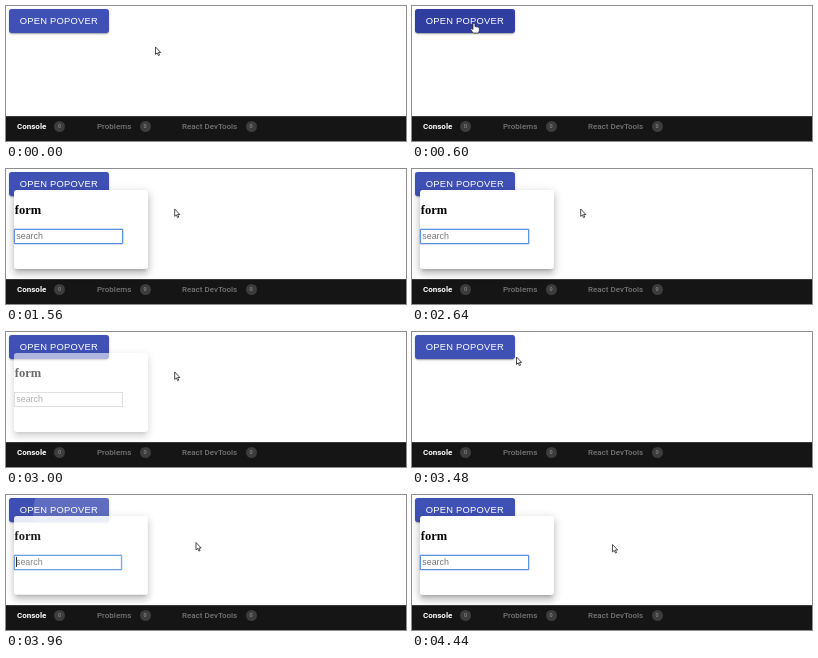
Write an HTML page that moves like this. It is 400 px wide and 135 px high and loops after 5040 ms.

```html
<!DOCTYPE html>
<html lang="en">
<head>
<meta charset="utf-8">
<title>Popover form</title>
<style>
html, body { margin: 0; width: 100%; height: 100%; overflow: hidden; background: #fff; }
#stage { position: relative; width: 400px; height: 135px; overflow: hidden; background: #fff; }
#stage div, #stage span, #stage svg { position: absolute; white-space: pre; }
#button {
  left: 3px; top: 3px; width: 100px; height: 24px; border-radius: 2.7px;
  box-shadow: 0 2px .7px -1.3px rgba(0,0,0,.2), 0 1.3px 1.3px rgba(0,0,0,.14), 0 .7px 3.3px rgba(0,0,0,.12);
  overflow: hidden;
}
#label { left: 10.7px; color: #fff; font: 9.33px/24px "Liberation Sans", Arial, sans-serif; letter-spacing: .27px; }
#ripple { border-radius: 50%; background: #fff; }
#bar { left: 0; top: 110px; width: 400px; height: 25px; background: #151515; box-shadow: inset 0 1px #3a3a3a; }
#bar .tab { top: 5.6px; color: #757575; font: 500 8px/10px Roboto, sans-serif; }
#bar .on { color: #fff; font-weight: 700; }
#bar .badge {
  top: 5px; width: 11px; height: 11px; border-radius: 50%; background: #3c3c3c;
  color: #858585; font: 500 5.5px/11px Roboto, sans-serif; text-align: center;
}
#popover {
  left: 8.3px; top: 21px; width: 134px; height: 79px; border-radius: 2.7px; background: #fff;
  transform-origin: 0 0;
  box-shadow: 0 3.3px 3.3px -2px rgba(0,0,0,.2), 0 5.3px 6.7px .7px rgba(0,0,0,.14), 0 2px 9.3px 1.3px rgba(0,0,0,.12);
}
#title { left: .5px; top: 12.8px; color: #000; font: bold 12.5px/14px "Liberation Serif", Times, serif; }
#field { left: 0; top: 38.6px; width: 106.4px; height: 13px; border: 1px solid #c8c8c8; }
#field.focus { border-color: #5a93e2; box-shadow: 0 0 0 .5px rgba(90,147,226,.6); border-radius: .7px; }
#hint { left: 1px; top: 1.5px; color: #757575; font: 8.9px/10px "Liberation Sans", Arial, sans-serif; }
#caret { left: .6px; top: 1.5px; width: .8px; height: 10px; background: #111; }
#stage svg { left: 0; top: 0; width: 400px; height: 135px; }
</style>
</head>
<body>
<div id="stage">
  <div id="button"><span id="label">OPEN POPOVER</span><div id="ripple"></div></div>
  <div id="bar">
    <span class="tab on" style="left:11px">Console</span><span class="badge" style="left:48px">0</span>
    <span class="tab" style="left:91px">Problems</span><span class="badge" style="left:133.5px">0</span>
    <span class="tab" style="left:176px">React DevTools</span><span class="badge" style="left:239.5px">0</span>
  </div>
  <div id="popover">
    <span id="title">form</span>
    <div id="field"><span id="hint">search</span><div id="caret"></div></div>
  </div>
  <svg viewBox="0 0 400 135">
    <path id="arrow" d="M0 0V7.4L1.7 5.9L2.9 8.6L4.1 8.1L2.9 5.5H5.2Z" fill="#fff" stroke="#222" stroke-width=".8" stroke-linejoin="round"/>
    <path id="hand" d="M-1 .8Q0 -.6 1 .8V3.7Q2 3 2.7 4Q3.7 3.4 4.2 4.4Q5.2 4 5.3 5.4V7.4L4.4 10H-.9L-3.2 6.6Q-3.3 5.2 -2 5.6L-1 6.5Z" fill="#fff" stroke="#222" stroke-width=".7" stroke-linejoin="round"/>
  </svg>
</div>
<script>
const LOOP = 5040, STEP = 120, GROW = 249, HOVER = 250, RIPPLE = 550;
const $ = id => document.getElementById(id);
const clamp = v => Math.min(1, Math.max(0, v));
const mix = (a, b, k) => a + (b - a) * k;

// cubic-bezier(.4, 0, .2, 1), solved by bisection
function ease(x) {
  x = clamp(x);
  let lo = 0, hi = 1;
  for (let i = 0; i < 20; i++) {
    const u = (lo + hi) / 2, v = 1 - u;
    if (1.2 * v * v * u + .6 * v * u * u + u * u * u < x) lo = u; else hi = u;
  }
  return lo * lo * (3 - 2 * lo);
}
const ramp = (t, start, length) => ease((t - start) / length);

// time, x, y of the pointer tip
const path = [
  [0, 149.5, 41], [120, 145, 39.5], [240, 125, 34], [360, 96, 25], [480, 72, 19.5], [600, 62, 17],
  [960, 62, 17], [1080, 100, 28], [1200, 150, 39], [1320, 168.7, 40],
  [3120, 168.7, 40], [3240, 157, 38], [3360, 128, 31], [3480, 104.5, 25], [3600, 84, 19],
  [3720, 79, 17], [3840, 84, 18], [3960, 190, 47.5], [4080, 198, 49], [4200, 200.5, 49.5], [LOOP, 200.5, 49.5]
];
const visits = [
  { hover: 350, press: 840, open: 930, close: 2920, x: 62, y: 18 },
  { hover: 3540, press: 3720, open: 3810, close: Infinity, x: 80, y: 18 }
];

function pointerAt(t) {
  const i = path.findIndex(p => p[0] > t), a = path[i - 1], b = path[i];
  const k = (t - a[0]) / (b[0] - a[0]);
  return [mix(a[1], b[1], k), mix(a[2], b[2], k)];
}

function drawButton(t, v) {
  const h = ramp(t, v.hover, HOVER) * (1 - ramp(t, v.open, HOVER));
  const rgb = [[63, 48], [81, 63], [181, 159]].map(([a, b]) => Math.round(mix(a, b, h)));
  $('button').style.background = `rgb(${rgb})`;

  const x = v.x - 3, y = v.y - 3;
  const full = Math.hypot(Math.max(x, 100 - x), Math.max(y, 24 - y));
  const grow = ramp(t, v.press, RIPPLE), r = full * grow, s = $('ripple').style;
  s.left = x - r + 'px';
  s.top = y - r + 'px';
  s.width = s.height = 2 * r + 'px';
  s.opacity = mix(.1, .3, grow) * (1 - ramp(t, v.open, RIPPLE));
}

function drawPopover(t, v) {
  const closing = t >= v.close;
  const shown = closing ? 1 - ramp(t, v.close, GROW) : ramp(t, v.open, GROW);
  const size = closing ? 1 - ramp(t, v.close + GROW / 3, GROW * 2 / 3) : ramp(t, v.open, GROW * 2 / 3);
  const s = $('popover').style;
  s.opacity = shown;
  s.visibility = shown > 0 ? 'visible' : 'hidden';
  s.transform = size === 1 ? 'none' : `scale(${mix(.75, 1, size)}, ${mix(.5625, 1, size)})`;
  const focused = t >= v.open && t < v.close - 40;
  $('field').className = focused ? 'focus' : '';
  const blink = Math.floor((t - v.open) / 545) % 2 === 0;
  $('caret').style.opacity = focused && blink ? 1 : 0;
}

function drawPointer(t, v) {
  const [x, y] = pointerAt(t);
  const covered = t >= v.open && t < v.close + GROW;
  const over = !covered && x > 3 && x < 103 && y > 3 && y < 27;
  for (const id of ['arrow', 'hand']) {
    $(id).setAttribute('transform', `translate(${x} ${y})`);
    $(id).style.display = (id === 'hand') === over ? '' : 'none';
  }
}

function draw(t) {
  const v = visits[t < 3480 ? 0 : 1];
  drawButton(t, v);
  drawPopover(t, v);
  drawPointer(t, v);
}

const begin = performance.now();
function tick() {
  const t = (performance.now() - begin) % LOOP;
  draw(Math.floor(t / STEP) * STEP);
  requestAnimationFrame(tick);
}
draw(0);
requestAnimationFrame(tick);
</script>
</body>
</html>
```
